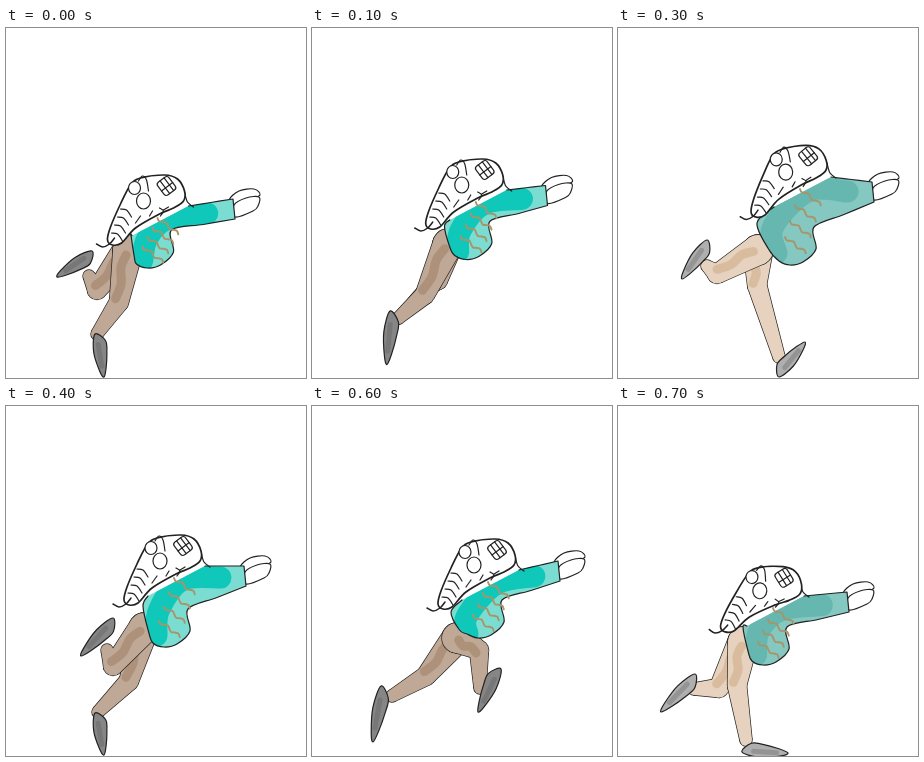
Animation of 300x350 px, one loop 800 ms. Source, as an HTML page:

```html
<!DOCTYPE html>
<html lang="en">
<head>
<meta charset="utf-8">
<title>Runner</title>
<style>
html, body { margin: 0; width: 100%; height: 100%; overflow: hidden; background: #fff; }
svg { display: block; width: 100%; height: 100%; }
</style>
</head>
<body>
<svg id="stage" viewBox="0 0 300 350" fill="none" stroke="#222" stroke-width="1.2" stroke-linecap="round" stroke-linejoin="round"></svg>
<script>
const stage = document.getElementById('stage');
const STEP = 100;
const LEG_RADII = [15, 9.5, 6];
let clipCount = 0;

const add = (p, x, y) => [p[0] + x, p[1] + y];
const lerp = (a, b, k) => a.map((v, i) => v + (b[i] - v) * k);
const range = n => [...Array(n).keys()];

// Point at fraction k from a to b, pushed sideways by off.
function beside(a, b, k, off) {
  const len = Math.hypot(b[0] - a[0], b[1] - a[1]);
  const p = lerp(a, b, k);
  return add(p, -(b[1] - a[1]) / len * off, (b[0] - a[0]) / len * off);
}

// Catmull-Rom curve through the points.
function curve(pts, closed) {
  const n = pts.length;
  const at = i => pts[closed ? (i + n) % n : Math.max(0, Math.min(n - 1, i))];
  let d = `M${pts[0]}`;
  for (let i = 0; i < (closed ? n : n - 1); i++) {
    const [p, a, b, q] = [-1, 0, 1, 2].map(j => at(i + j));
    const c1 = add(a, (b[0] - p[0]) / 6, (b[1] - p[1]) / 6);
    const c2 = add(b, (a[0] - q[0]) / 6, (a[1] - q[1]) / 6);
    d += `C${c1} ${c2} ${b}`;
  }
  return d + (closed ? 'Z' : '');
}

const line = (pts, attrs = '') => `<path d="${curve(pts)}" ${attrs}/>`;
const shape = (pts, fill, attrs = '') => `<path d="${curve(pts, true)}" fill="${fill}" ${attrs}/>`;
const wash = (pts, color, width, opacity) =>
  line(pts, `stroke="${color}" stroke-width="${width}" stroke-opacity="${opacity}"`);

// Two tapered segments merged into one outlined limb.
function limb(joints, fill) {
  const parts = joints.map(([x, y], i) => `<circle cx="${x}" cy="${y}" r="${LEG_RADII[i]}"/>`);
  for (const i of range(joints.length - 1)) {
    const [a, b, r, s] = [joints[i], joints[i + 1], LEG_RADII[i], LEG_RADII[i + 1]];
    parts.push(`<path d="M${beside(a, b, 0, r)}L${beside(a, b, 1, s)}L${beside(a, b, 1, -s)}L${beside(a, b, 0, -r)}Z"/>`);
  }
  const body = parts.join('');
  return `<g stroke-width="1.4">${body}</g><g fill="${fill}" stroke="none">${body}</g>`;
}

function shoe({ heel, toe, ankle }, paint) {
  const cross = (toe[0] - heel[0]) * (ankle[1] - heel[1]) - (toe[1] - heel[1]) * (ankle[0] - heel[0]);
  const side = cross < 0 ? -1 : 1;
  const at = (k, off) => beside(heel, toe, k, off * side);
  return shape([heel, at(.2, 9), at(.45, 8), at(.8, 4), toe, at(.85, -3), at(.4, -5)], paint.shoe) +
    wash([at(.25, 1), at(.75, 0)], '#555', 5, .3);
}

function drawLeg(hip, leg, paint) {
  const { knee, ankle } = leg;
  return limb([hip, knee, ankle], paint.skin) +
    wash([.1, .35, .65, .95].map((k, i) => beside(hip, knee, k, i % 2 ? 4 : 1)), paint.brown, 9, .5) +
    shoe(leg, paint);
}

function drawHands(cuff) {
  const mitt = pts => shape(pts.map(p => add(cuff, ...p)), '#fff');
  return mitt([[-6, -9], [4, -18], [19, -20], [25, -14], [14, -9], [0, -4]]) +
    mitt([[-1, -4], [11, -11], [24, -12], [23, -3], [18, 2], [0, 8]]);
}

function drawShirt({ head, waist, belly, cuff, paint }) {
  const bottom = [head[0] + 166, belly];
  const armpit = [head[0] + 190, belly - 38];
  const collar = add(head, 207, 146);
  const shoulder = add(head, 184, 160);
  const [top, under] = [add(cuff, -2, -10), add(cuff, 0, 10)];
  const hem = add(lerp(waist, bottom, .5), -5, 5);
  const arm = curve([collar, lerp(collar, top, .5), top]).slice(1);
  const torso = curve([under, lerp(under, armpit, .5), armpit, add(armpit, 2, 22), add(bottom, 13, -3),
    bottom, add(bottom, -11, -4), hem, waist, add(head, 150, 176)]).slice(1);
  const d = `M${arm}L${torso}`;
  const id = 'shirt' + clipCount++;
  const gap = (belly - head[1] - 170) / 4;
  return `<clipPath id="${id}"><path d="${d}"/></clipPath>
    <path d="${d}" fill="${paint.light}" stroke="none"/>
    <g clip-path="url(#${id})">${wash([add(hem, 8, 4), add(waist, 16, 4), shoulder, lerp(shoulder, cuff, .6)], paint.dark, 22, 1)}</g>
    <path d="${d}"/>` +
    range(4).map(i => stripe(add(head, 176 - 5 * i, 158 + gap * i))).join('');
}

// Wavy knit stripe running down to the right.
function stripe(from) {
  const to = add(from, 21, 16);
  const pts = range(9).map(i => beside(from, to, i / 8, 1.6 * Math.sin(i * 1.6)));
  return line(pts, 'stroke="#a89468" stroke-width="1.9"');
}

const face = [
  shape([[131, 185], [126, 180], [129, 167], [139, 144], [149, 125], [159, 118], [183, 115], [196, 119],
    [203, 131], [202, 141], [192, 148], [178, 154], [154, 168], [140, 183]], '#fff', 'stroke-width="1.7"'),
  line([[115, 184], [121, 187], [128, 184], [133, 178]], 'stroke-width="1.5"'),
  '<ellipse cx="153" cy="128" rx="6" ry="6.5" fill="#fff"/>',
  '<ellipse cx="162" cy="141" rx="7" ry="8" fill="#fff"/>',
  line([[157, 121], [161, 116], [165, 120], [167, 131]]),
  `<g transform="translate(185 126) rotate(-37)"><rect x="-7" y="-8" width="14" height="16" rx="3" fill="#fff"/>
    <path d="M-2-8V8M3-8V8M-7 1H7"/></g>`,
  line([[178, 148], [182, 151], [179, 156]]),
  line([[182, 150], [187, 147]]),
  line([[171, 151], [168, 156]]),
  line([[159, 156], [154, 163]]),
  ...range(4).map(i => line([[130 + 3 * i, 173 - 8 * i], [136 + 3 * i, 174 - 8 * i], [141 + 3 * i, 181 - 8 * i]]))
].join('');

function drawPose(p) {
  const [x, y] = p.head;
  return drawLeg(p.hip, p.far, p.paint) + drawLeg(p.hip, p.near, p.paint) +
    drawHands(p.cuff) + drawShirt(p) +
    line([add(p.head, 203, 132), add(p.head, 206, 142), add(p.head, 212, 147)]) +
    `<g transform="translate(${x} ${y}) rotate(${p.turn} 165 150)">${face}</g>`;
}

// Blend of two poses, keeping the paint of the first.
function mix(a, b, k) {
  if (typeof a === 'number') return a + (b - a) * k;
  if (typeof a === 'string') return a;
  if (Array.isArray(a)) return a.map((v, i) => mix(v, b[i], k));
  return Object.fromEntries(Object.keys(a).map(key => [key, mix(a[key], b[key], k)]));
}

const bright = { light: '#7bddd2', dark: '#10c8b9', skin: '#bfa895', brown: '#9b7c60', shoe: '#868686' };
const pale = { light: '#84c8c1', dark: '#66b7af', skin: '#e6d2be', brown: '#cda57f', shoe: '#afafaf' };

const crouch = {
  paint: bright, head: [-24.5, 32], turn: 0, waist: [125, 207], belly: 240, cuff: [229, 181], hip: [122, 222],
  far: { knee: [91, 262], ankle: [83, 248], heel: [86, 223], toe: [51, 249] },
  near: { knee: [113, 274], ankle: [91, 306], heel: [89, 306], toe: [98, 349] }
};
const stride = {
  paint: bright, head: [0, 0], turn: 0, waist: [140, 190], belly: 223, cuff: [242, 154], hip: [150, 210],
  far: { knee: [161, 242], ankle: [148, 276], heel: [172, 271], toe: [139, 301] },
  near: { knee: [113, 259], ankle: [81, 275], heel: [67, 260], toe: [52, 324] }
};
const plant = {
  paint: pale, head: [6, 3], turn: -2, waist: [139, 195], belly: 237, cuff: [256, 164], hip: [140, 222],
  far: { knee: [139, 257], ankle: [161, 329], heel: [161, 349], toe: [187, 314] },
  near: { knee: [99, 246], ankle: [89, 238], heel: [89, 212], toe: [64, 251] }
};
const push = {
  paint: bright, head: [-8, 14], turn: 0, waist: [137, 200], belly: 241, cuff: [240, 170], hip: [138, 222],
  far: { knee: [123, 275], ankle: [92, 306], heel: [89, 307], toe: [98, 349] },
  near: { knee: [107, 260], ankle: [101, 244], heel: [107, 212], toe: [75, 250] }
};
const leap = {
  paint: bright, head: [0, 18], turn: 0, waist: [139, 206], belly: 232, cuff: [248, 165], hip: [145, 232],
  far: { knee: [114, 270], ankle: [80, 290], heel: [69, 280], toe: [61, 336] },
  near: { knee: [167, 244], ankle: [168, 282], heel: [189, 263], toe: [166, 306] }
};
const land = {
  paint: pale, head: [-21, 44], turn: 5, waist: [125, 221], belly: 259, cuff: [231, 196], hip: [125, 236],
  far: { knee: [101, 282], ankle: [76, 283], heel: [77, 268], toe: [43, 306] },
  near: { knee: [119, 279], ankle: [128, 334], heel: [124, 346], toe: [170, 347] }
};

const run = [crouch, mix(crouch, stride, .5), stride, plant, push, mix(push, leap, .5), leap, land];
stage.innerHTML = run.map(pose => `<g class="pose" visibility="hidden">${drawPose(pose)}</g>`).join('');
const poses = [...stage.querySelectorAll('.pose')];

function update(time) {
  const current = Math.floor(time / STEP) % poses.length;
  poses.forEach((pose, i) => pose.setAttribute('visibility', i === current ? 'visible' : 'hidden'));
}

const start = performance.now();
function tick() {
  update(performance.now() - start);
  requestAnimationFrame(tick);
}
tick();
</script>
</body>
</html>
```
